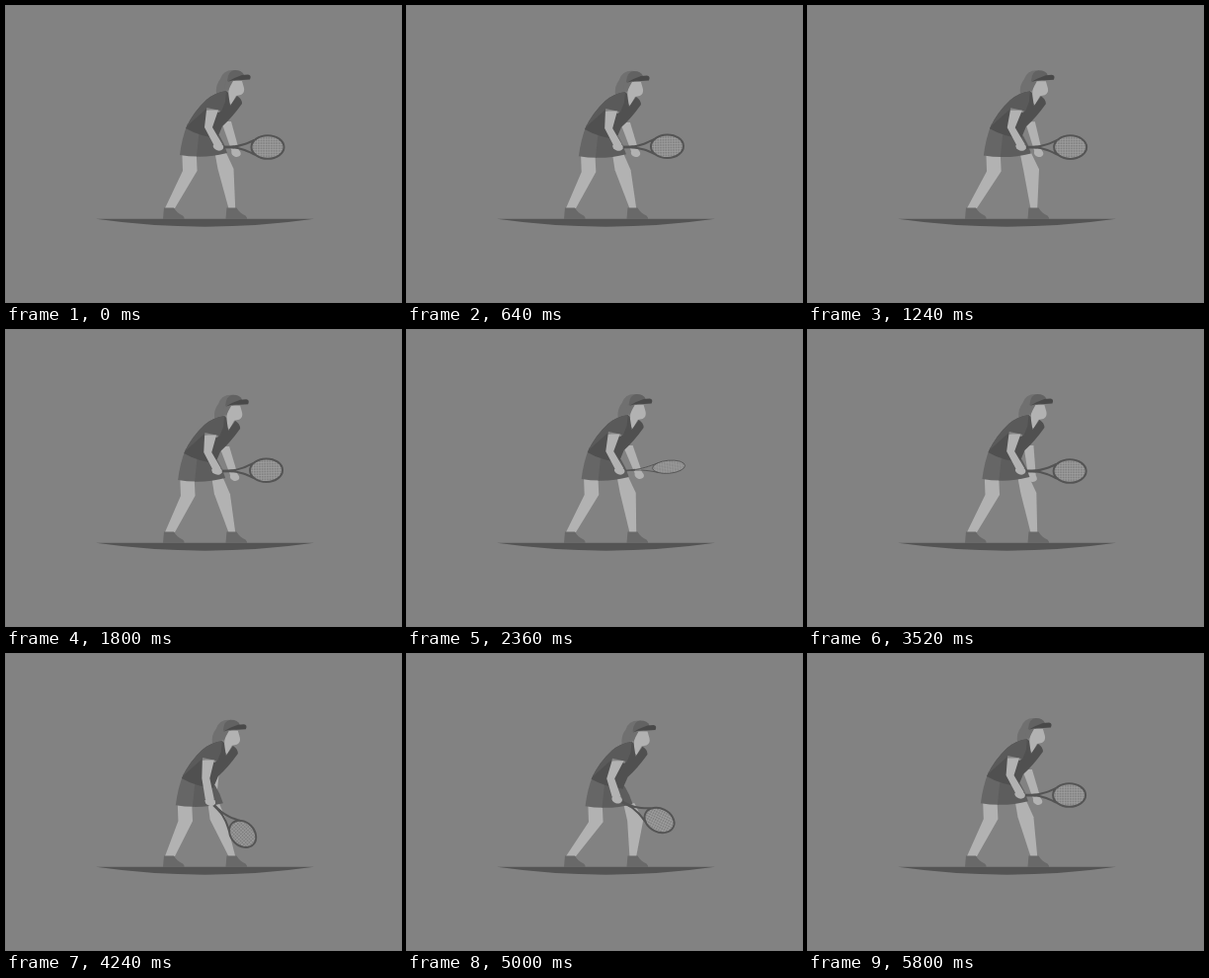
These frames come from a looping animation (400x300 px, 5.84 s). An HTML page with a canvas:

```html
<!DOCTYPE html>
<html lang="en">
<head>
<meta charset="utf-8">
<title>Tennis player</title>
<style>
html, body { margin: 0; width: 100%; height: 100%; overflow: hidden; background: #828282; }
canvas { display: block; width: 400px; height: 300px; }
</style>
</head>
<body>
<canvas id="stage"></canvas>
<script>
const LOOP = 5840, SWAYS = 5;
const SKIN = '#b2b2b2', HAIR = '#707070', DARK = '#545454';
const canvas = document.getElementById('stage');
const ctx = canvas.getContext('2d');
const ratio = window.devicePixelRatio || 1;
canvas.width = 400 * ratio;
canvas.height = 300 * ratio;

function ease(t, from, to) {
  const u = Math.min(1, Math.max(0, (t - from) / (to - from)));
  return u * u * (3 - 2 * u);
}

// Rises from 0 to 1 between a and b, falls back between c and d.
const pulse = (t, a, b, c, d) => ease(t, a, b) - ease(t, c, d);

function shape(color, d) {
  ctx.fillStyle = color;
  ctx.fill(new Path2D(d));
}

function at(x, y, paint) {
  ctx.save();
  ctx.translate(x, y);
  paint();
  ctx.restore();
}

function oval(x, y, rx, ry) {
  ctx.beginPath();
  ctx.ellipse(x, y, rx, ry, 0, 0, 2 * Math.PI);
}

// A limb runs through joints [x, y, half width].
function limb(...joints) {
  const left = joints.map(([x, y, r]) => [x - r, y]);
  const right = joints.map(([x, y, r]) => [x + r, y]).reverse();
  shape(SKIN, 'M' + [...left, ...right].join('L') + 'Z');
}

function hand(x, y, rx, ry) {
  at(x, y, () => {
    ctx.rotate(.3);
    ctx.fillStyle = SKIN;
    oval(0, 0, rx, ry);
    ctx.fill();
  });
}

function shoe() {
  shape('#696969', 'M1 -11.5H11Q14 -6 20 -3.5Q22 -2 21.5 0H0Z');
}

function skirt() {
  shape('#666', 'M184 119Q178 134 176 151Q185 152.5 194 152.5L197 126Z');
  shape('#5d5d5d', 'M196 124L193 152.6Q209 153 224 149Q221 139 216 131Z');
}

function head() {
  shape(HAIR, 'M232 65Q220 64 217 74Q212 80 213 89L225 85L234 73Z');
  shape(SKIN, 'M226 76H239L241 83Q242 88 238 90L233 91L228 100L225 97Z');
  shape(HAIR, 'M223 75L230 76Q227 81 225 86L221 84Z');
  shape('#626262', 'M224 76Q225 65 232 65Q239 65 241 70L238 75Z');
  shape('#494949', 'M224 77Q230 73 239 70L245 69.5Q249 70 247 74.5L239 75Q231 74 224 77Z');
}

function shirt() {
  shape('#505050', 'M223 86Q211 88 203 95Q190 107 182 124Q196 132 214 134L219 122Q229 113 239 99Q239 94 234 91L227 101L225 88Z');
  shape('#5a5a5a', 'M223 86Q211 88 203 95Q190 107 183 122L203 104L218 107L222 97Z');
  shape('#858585', 'M203.4 103L217 106L216 108L202.8 105.3Z');
}

function strings(rx, ry, gap, flat) {
  oval(0, 0, rx, ry);
  ctx.clip();
  ctx.beginPath();
  for (let i = -6; i <= 6; i++) {
    const p = i * gap;
    ctx.moveTo(p, -ry);
    ctx.lineTo(p, ry);
    ctx.moveTo(-rx, p * flat);
    ctx.lineTo(rx, p * flat);
  }
  ctx.strokeStyle = '#a2a2a2';
  ctx.lineWidth = .3 + .4 * flat;
  ctx.stroke();
}

function racket(angle, size, turn) {
  const flat = Math.max(.06, Math.abs(turn));
  const rx = 16.5, ry = 11.8 * flat, weight = .4 + 1.6 * flat * flat;
  ctx.rotate(angle * Math.PI / 180);
  ctx.scale(size, 1);
  at(49, 0, () => strings(rx, ry, 2.6, flat));

  ctx.strokeStyle = DARK;
  ctx.lineWidth = weight;
  oval(49, 0, rx, ry);
  for (const side of [-flat, flat]) {
    ctx.moveTo(11, 0);
    ctx.bezierCurveTo(23, side, 29, 4 * side, 38, 8.5 * side);
  }
  ctx.stroke();
  ctx.lineWidth = weight + .8;
  ctx.beginPath();
  ctx.moveTo(-3, 0);
  ctx.lineTo(15, 0);
  ctx.stroke();
}

function draw(t) {
  // Body sway: one side-to-side swing holds two dips.
  const a = 2 * Math.PI * SWAYS * t / LOOP;
  const s = Math.sin(a), c = 1 - Math.cos(a);
  const bx = 5 * s - .3 * c, by = 2.8 * s * s + .45 * c;
  const top = by * .85;

  const dip = pulse(t, 3760, 4180, 4760, 5300);
  const hide = pulse(t, 3760, 4100, 4980, 5450);
  const flick = pulse(t, 2000, 2360, 2360, 2900);
  const grip = pulse(t, 2800, 3400, 3760, 4100);
  const spin = 2 * ease(t, 2180, 2900);

  const sx = 1.8 * s - .5 * c, sy = .8 * s * s;
  const hx = 215 + sx - 6 * dip, hy = 143 + sy + 7 * dip;
  const fx = 233 + sx + 2 * flick - 6 * grip - 21 * hide;
  const fy = 149 + sy - 2 * flick + grip - 8 * hide;

  ctx.setTransform(ratio, 0, 0, ratio, 0, 0);
  ctx.fillStyle = '#828282';
  ctx.fillRect(0, 0, 400, 300);
  shape(DARK, 'M91 215.8H312Q201.5 231.5 91 215.8Z');

  limb([217 + 1.7 * bx, 148 + by, 5.6], [222.5 + 1.9 * bx, 165 + 1.2 * by, 8], [228.8, 205, 3.4]);
  limb([185.5 + 1.1 * bx, 148 + by, 7.2], [186.3 + 1.1 * bx, 167 + by, 7.3], [166, 205, 5]);
  at(159, 216, shoe);
  at(222.5, 216, shoe);

  limb([223 + bx - 8 * hide, 117 + top, 5], [fx, fy, 3.8]);
  hand(fx, fy, 4.8, 3.8);
  at(bx, by, skirt);
  at(bx, by * .8, head);
  at(bx, top, shirt);
  at(hx + 1, hy, () => racket(46 * dip - 5 * flick - .5 * c, 1 - .08 * dip, Math.cos(Math.PI * spin)));
  limb([209 + bx, 105.5 + top, 6], [205 + .4 * bx - dip, 123 + top + dip, 4], [hx - .5, hy - 3, 4.5]);
  hand(hx, hy - .5, 5.4, 4);
}

const start = performance.now();
function tick(now) {
  const t = Math.max(0, now - start) % LOOP;
  draw(Math.floor(t / 40) * 40);
  requestAnimationFrame(tick);
}
draw(0);
requestAnimationFrame(tick);
</script>
</body>
</html>
```
